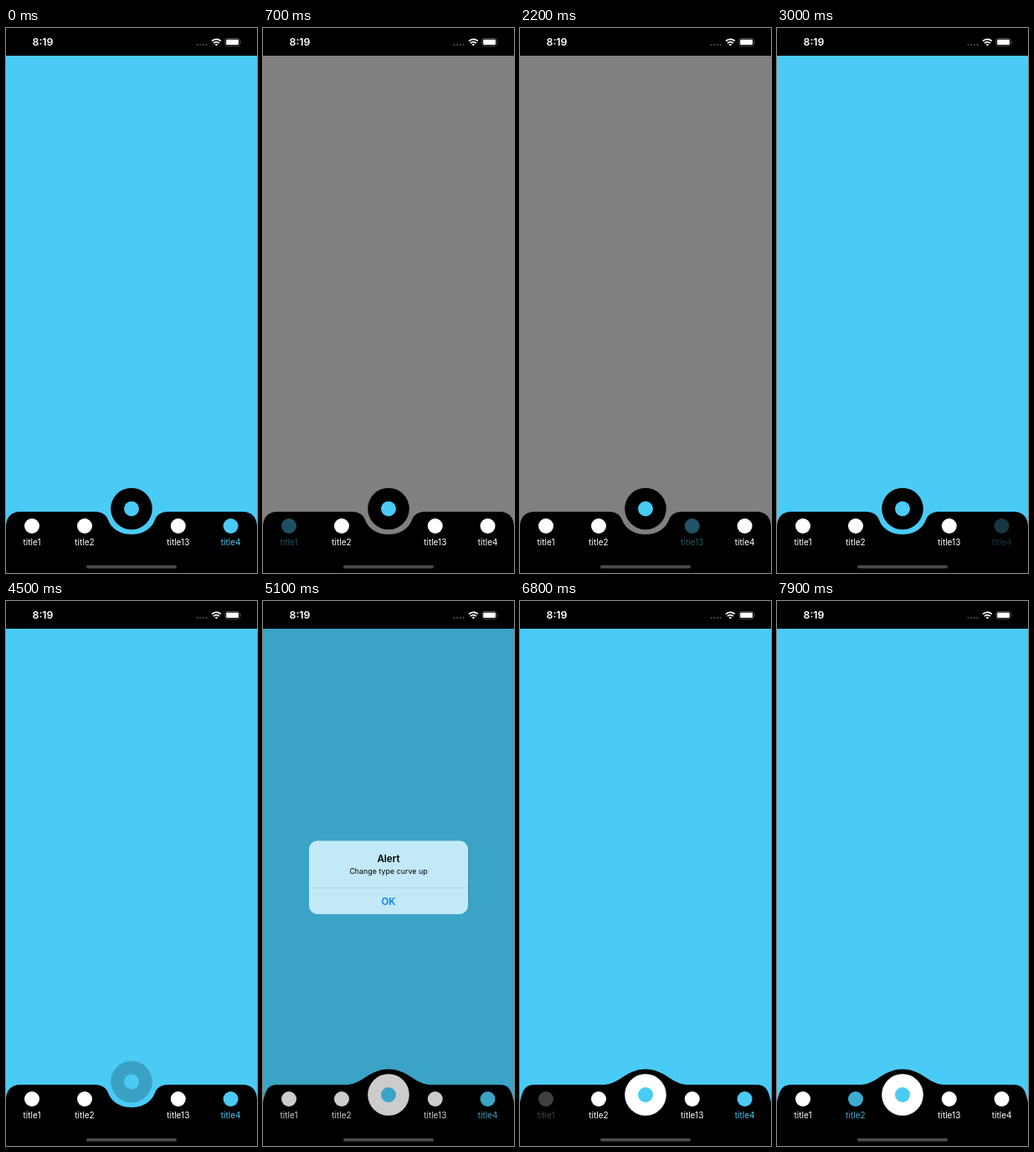
These frames come from a looping animation (300 by 649 pixels, 8 s). An HTML page:

```html
<!DOCTYPE html>
<html lang="en">
<head>
<meta charset="utf-8">
<title>Curved tab bar</title>
<style>
  html, body { margin: 0; width: 100%; height: 100%; overflow: hidden; background: #000; }
  svg { display: block; width: 100vw; height: 100vh; }
  text { font-family: Inter, Roboto, sans-serif; text-anchor: middle; }
  .tab { font-size: 10px; }
  .strong { font-weight: 600; }
</style>
</head>
<body>
<svg viewBox="0 0 300 649" preserveAspectRatio="none">
  <rect width="300" height="649"/>
  <rect id="screen" y="33" width="300" height="616"/>
  <path id="bar"/>
  <g id="tabs"></g>
  <g id="button">
    <circle id="disc" cx="150" r="24.8"/>
    <circle id="mark" cx="150" r="9" fill="#4acbf6"/>
  </g>
  <rect id="dim" y="33" width="300" height="616"/>

  <g id="alert">
    <rect x="55" y="285.5" width="190" height="87.5" rx="10" fill="#c2e9f7"/>
    <path id="pressed" d="M55 341.5H245V363a10 10 0 0 1-10 10H65a10 10 0 0 1-10-10Z" fill="#a9d3e3"/>
    <path d="M55 341.5H245" stroke="#a3cbd9" stroke-width=".7"/>
    <text class="strong" x="150" y="311" font-size="11.6">Alert</text>
    <text x="150" y="325" font-size="8.9">Change type curve up</text>
    <text class="strong" x="150" y="361.6" font-size="11.5" fill="#087cf5">OK</text>
  </g>

  <g fill="#fff">
    <text class="strong" x="44" y="21.2" font-size="12.3">8:19</text>
    <g fill="#555">
      <circle cx="228.6" cy="20" r="1.1"/><circle cx="232.2" cy="20" r="1.1"/>
      <circle cx="235.9" cy="20" r="1.1"/><circle cx="239.6" cy="20" r="1.1"/>
    </g>
    <g fill="none" stroke="#fff" stroke-width="1.8">
      <path d="M246 15.7a7.6 7.6 0 0 1 10.8 0M248 18a4.8 4.8 0 0 1 6.8 0"/>
    </g>
    <path d="M249.7 19.6a2.5 2.5 0 0 1 3.4 0l-1.7 1.8z"/>
    <rect x="261.9" y="12.5" width="17.4" height="8.8" rx="2.4" fill="none" stroke="#666" stroke-width=".8"/>
    <rect x="263.2" y="13.8" width="14.8" height="6.2" rx="1.3"/>
    <path d="M280.3 15.4q1.2 1.5 0 3z" fill="#777"/>
  </g>
  <rect x="96" y="639.8" width="108" height="3.8" rx="1.9" fill="#4c4c4c"/>
</svg>

<script>
const CYAN = '#4acbf6', GRAY = '#808080', LOOP = 8000, STEP = 100;
const $ = id => document.getElementById(id);

const TABS = [
  { label: 'title1', x: 31, screen: GRAY },
  { label: 'title2', x: 94, screen: CYAN },
  { label: 'title13', x: 205.8, screen: GRAY },
  { label: 'title4', x: 268.6, screen: CYAN },
];
const BUTTON = 4;

const BAR = {
  down: 'M0 649V594C0 582 7 576 17 576H107C114 576 119.5 579.5 121.7 585C126 597 137 603 150 603' +
        'S174 597 178.3 585C180.5 579.5 186 576 193 576H283C293 576 300 582 300 594V649Z',
  up: 'M0 649V597C3 582 6 576 18 576H100C118 576 127 557.5 150 557.5' +
      'S182 576 200 576H282C294 576 297 582 300 597V649Z',
};

// Each row changes part of the state and holds until the next one.
const START = { selected: 3, touched: 0, opacity: 1, up: false, alert: 0, scale: 1, ok: false };
const TIMELINE = [
  [500, { touched: 0, opacity: .25 }],
  [700, { selected: 0, opacity: .4 }],
  [800, { opacity: .85 }],
  [900, { opacity: 1 }],

  [1300, { touched: 1, opacity: .4 }],
  [1400, { selected: 1, opacity: .27 }],
  [1500, { opacity: .7 }],
  [1600, { opacity: 1 }],

  [2000, { touched: 2, opacity: .25 }],
  [2200, { selected: 2, opacity: .42 }],
  [2300, { opacity: .85 }],
  [2400, { opacity: 1 }],

  [2900, { touched: 3, opacity: .4 }],
  [3000, { selected: 3, opacity: .27 }],
  [3100, { opacity: .7 }],
  [3200, { opacity: 1 }],

  [4500, { touched: BUTTON, opacity: .2 }],
  [4700, { up: true, opacity: .35 }],
  [4800, { opacity: .8, alert: .5, scale: 1.12 }],
  [4900, { opacity: 1, alert: .88, scale: 1.04 }],
  [5000, { alert: .98, scale: 1.01 }],
  [5100, { alert: 1, scale: 1 }],

  [5700, { ok: true }],
  [5800, { ok: false }],
  [5900, { alert: .6 }],
  [6000, { alert: .25 }],
  [6100, { alert: .06 }],
  [6200, { alert: 0 }],

  [6800, { touched: 0, opacity: .25 }],
  [6900, { opacity: .2 }],
  [7000, { selected: 0, opacity: .4 }],
  [7100, { opacity: .85 }],
  [7200, { opacity: 1 }],

  [7600, { touched: 1, opacity: .25 }],
  [7800, { selected: 1, opacity: .42 }],
  [7900, { opacity: .85 }],
];

$('tabs').innerHTML = TABS.map(({ label, x }) =>
  `<g><circle cx="${x}" cy="593" r="9"/><text class="tab" x="${x}" y="616">${label}</text></g>`).join('');
const tabNodes = [...$('tabs').children];

function set(node, attributes) {
  for (const [name, value] of Object.entries(attributes)) node.setAttribute(name, value);
}

function stateAt(time) {
  const past = TIMELINE.filter(([at]) => at <= time).map(([, change]) => change);
  return Object.assign({}, START, ...past);
}

function draw(s) {
  const fade = index => s.touched === index ? s.opacity : 1;
  const discY = s.up ? 588 : 572.5;

  set($('screen'), { fill: TABS[s.selected].screen });
  set($('bar'), { d: s.up ? BAR.up : BAR.down });
  tabNodes.forEach((node, i) =>
    set(node, { fill: i === s.selected ? CYAN : '#fff', opacity: fade(i) }));
  set($('button'), { opacity: fade(BUTTON) });
  set($('disc'), { cy: discY, fill: s.up ? '#fff' : '#000' });
  set($('mark'), { cy: discY });
  set($('dim'), { opacity: s.alert * .2 });
  set($('alert'), {
    opacity: s.alert,
    transform: `translate(150 329) scale(${s.scale}) translate(-150 -329)`,
  });
  set($('pressed'), { opacity: s.ok ? 1 : 0 });
}

const origin = performance.now();
let shown = -1;
function tick() {
  const step = Math.floor((performance.now() - origin) % LOOP / STEP);
  if (step !== shown) draw(stateAt((shown = step) * STEP));
  requestAnimationFrame(tick);
}
tick();
</script>
</body>
</html>
```
